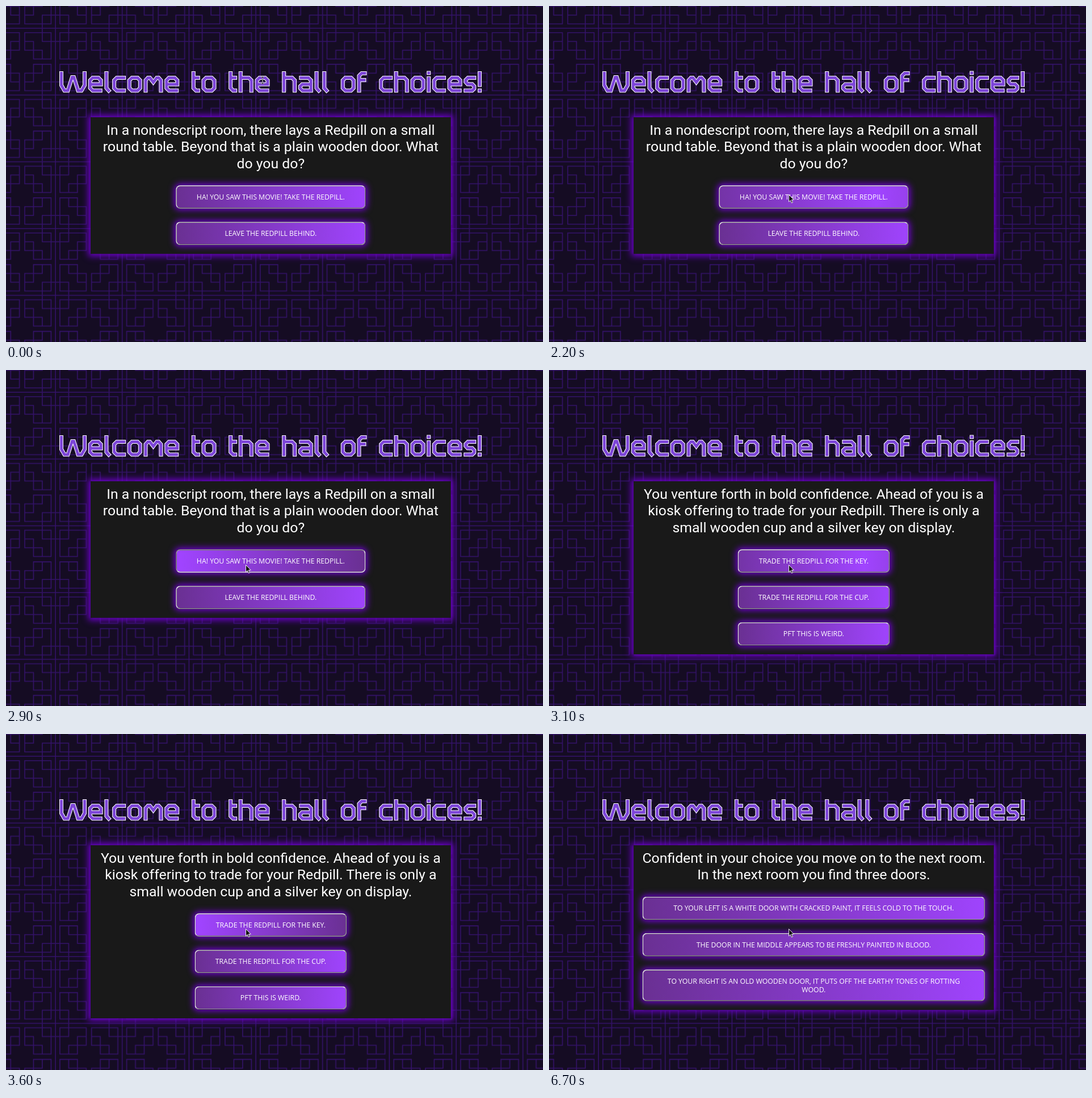
These frames come from a looping animation (946 px wide and 592 px high, 8 s). An HTML page:

```html
<!DOCTYPE html>
<html lang="en">
<head>
<meta charset="utf-8">
<title>Hall of choices</title>
<style>
  html, body { margin: 0; width: 100%; height: 100%; overflow: hidden; background: #150c23; }
  svg { position: absolute; left: 0; top: 0; }
  #panel {
    position: absolute; left: 148.8px; top: 196.2px; width: 820px; box-sizing: border-box;
    padding: 10px 20px 20px; background: #191919; color: #fff; text-align: center; white-space: pre;
    transform: scale(.774); transform-origin: 0 0; box-shadow: 0 0 14px 5px #6a00c8;
  }
  #panel p { margin: 0 0 31px; font: 32px/38px Roboto, sans-serif; }
  .choice {
    box-sizing: border-box; margin: 30px auto 0; padding: 15px 0;
    font: 15.85px/19px "Open Sans", sans-serif; text-transform: uppercase;
    border: 2px solid; border-color: #e6e6e6 #989898 #989898 #e6e6e6; border-radius: 10px;
    background: linear-gradient(to right, #6a3093 0%, #a044ff 51%, #6a3093 100%) 0 0 / 200% auto;
    box-shadow: 0 0 14px 4px #6a00c8;
  }
  p + .choice { margin-top: 0; }
  .choice.pressed { border-color: #989898 #e6e6e6 #e6e6e6 #989898; }
</style>
</head>
<body>
<svg id="back" width="946" height="592"></svg>
<div id="panel"></div>
<svg width="946" height="592">
  <g id="cursor">
    <path id="beam" d="M-3 -6H-1L0 -5L1 -6H3M0 -5V5M-3 6H-1L0 5L1 6H3" fill="none" stroke="#222" style="filter:drop-shadow(0 0 .6px #fff) drop-shadow(0 0 .4px #fff)"/>
    <path id="arrow" d="M.5 .5V13L3.4 10.4L5.4 15L7.4 14.1L5.4 9.6H9.3Z" fill="#111" stroke="#fff" stroke-width=".9"/>
  </g>
</svg>
<script>
const $ = id => document.getElementById(id);

// Background: one quadrant of the tile, mirrored four ways
const quadrant = 'M29 0V9M0 29H9M9 9H69V49H49V69H9ZM49 49V29H69M49 49H29V69M9 29H29V9';
const mirrors = ['1 0 0 1 0 0', '-1 0 0 1 150 0', '1 0 0 -1 0 150', '-1 0 0 -1 150 150'];
const tile = mirrors.map(m => `<path d="${quadrant}" transform="matrix(${m})"/>`).join('')
  + '<path d="M0 151H152M151 0V152"/>';

// Title lettering: [width, centre line]
const glyphs = {
  W: [48, 'M3.5 0V21L9 30.5H15L22.5 7H25.5L33 30.5H39L44.5 21V0'],
  e: [26, 'M3.5 19.5H22.5V12.5L18 8H8L3.5 12.5V26L8 30.5H21.5'],
  l: [11, 'M3.5 0V26L7.5 30.5'],
  c: [24, 'M20.5 8H8L3.5 12.5V26L8 30.5H20.5'],
  o: [26, 'M8 8H18L22.5 12.5V26L18 30.5H8L3.5 26V12.5Z'],
  m: [34, 'M3.5 30.5V12.5L7.5 8H11L17 16L23 8H26.5L30.5 12.5V30.5'],
  t: [15, 'M3.5 0V26L8 30.5H11.5M3.5 8H11.5'],
  h: [26, 'M3.5 0V30.5M3.5 8H18L22.5 12.5V30.5'],
  a: [26, 'M5 8H18L22.5 12.5V30.5H7.5L3.5 26.5V23L7 19.5H22.5'],
  f: [17, 'M3.5 30.5V4.5L8 0H13.5M3.5 12H12.5'],
  i: [7, 'M3.5 -.5h.01M3.5 9V30.5'],
  s: [22, 'M18.5 8H7.5L3.5 12V15.5L7 19.3H15L18.5 23V27L15 30.5H3.5'],
  '!': [7, 'M3.5 0V20.5M3.5 30.5h.01']
};

function lettering(text) {
  let x = 94, out = '';
  for (const ch of text) {
    if (ch === ' ') { x += 18.9; continue; }
    const [width, d] = glyphs[ch];
    out += `<path d="${d}" transform="translate(${x} 118.5)"/>`;
    x += width + 2.7;
  }
  return out;
}

const title = lettering('Welcome to the hall of choices!');
$('back').innerHTML = `
  <pattern id="temple" width="152" height="152" patternUnits="userSpaceOnUse"
    patternTransform="translate(-29.7 40) scale(.774)">
    <g fill="none" stroke="#34126a" stroke-width="2">${tile}</g>
  </pattern>
  <rect width="946" height="592" fill="url(#temple)"/>
  <g fill="none" stroke-linecap="square">
    <g stroke="#fff" stroke-width="7">${title}</g>
    <g stroke="#7d45d8" stroke-width="4.9">${title}</g>
  </g>`;

// Story: when each scene starts, when its first choice is hovered and pressed
const scenes = [
  { start: 0, hover: 2125, press: 2900, width: 432,
    text: 'In a nondescript room, there lays a Redpill on a small\nround table. Beyond that is a plain wooden door. What\ndo you do?',
    choices: ['Ha! You saw this movie! Take the Redpill.', 'Leave the Redpill behind.'] },
  { start: 3100, hover: 3025, press: 6500, width: 346,
    text: 'You venture forth in bold confidence. Ahead of you is a\nkiosk offering to trade for your Redpill. There is only a\nsmall wooden cup and a silver key on display.',
    choices: ['Trade the Redpill for the key.', 'Trade the Redpill for the cup.', 'Pft this is weird.'] },
  { start: 6700, hover: Infinity, press: Infinity, width: 780,
    text: 'Confident in your choice you move on to the next room.\nIn the next room you find three doors.',
    choices: ['To your left is a white door with cracked paint, it feels cold to the touch.',
      'The door in the middle appears to be freshly painted in blood.',
      'To your right is an old wooden door, it puts off the earthy tones of rotting\nwood.'] }
];

// Cursor path: [time, x, y]
const path = [[1200, 452, 131], [1300, 444, 146], [1400, 425, 172], [1600, 378, 245], [1700, 366, 278],
  [1800, 367, 300], [1900, 378, 310], [2000, 378, 310], [2100, 408, 314], [2200, 422, 332], [2400, 422, 343]];

function cursorAt(t) {
  const i = path.findIndex(p => p[0] > t);
  if (i === 0) return path[0].slice(1);
  if (i < 0) return path[path.length - 1].slice(1);
  const [a, b] = [path[i - 1], path[i]], k = (t - a[0]) / (b[0] - a[0]);
  return [a[1] + (b[1] - a[1]) * k, a[2] + (b[2] - a[2]) * k];
}

// CSS "ease" curve, solved by bisection
function ease(x) {
  if (x <= 0) return 0;
  if (x >= 1) return 1;
  const bezier = (s, a, b) => 3 * s * (1 - s) ** 2 * a + 3 * s * s * (1 - s) * b + s ** 3;
  let s = .5;
  for (let step = .25; step > 1e-5; step /= 2) s += bezier(s, .25, .25) < x ? step : -step;
  return bezier(s, .1, 1);
}

let shown;
function show(scene) {
  shown = scene;
  $('panel').innerHTML = `<p>${scene.text}</p>` + scene.choices.map(c =>
    `<div class="choice" style="width:${scene.width}px">${c}</div>`).join('');
}

function draw(now) {
  const t = Math.floor(now % 8000 / 100) * 100; // ten pictures per second
  const scene = scenes.filter(s => s.start <= t).pop();
  if (scene !== shown) show(scene);

  const first = $('panel').querySelector('.choice');
  first.style.backgroundPosition = ease((t - scene.hover) / 500) * 100 + '% 0';
  first.classList.toggle('pressed', t >= scene.press);

  const [x, y] = cursorAt(t), overTitle = y < 160;
  $('cursor').setAttribute('transform', `translate(${x} ${y})`);
  $('beam').style.display = overTitle ? '' : 'none';
  $('arrow').style.display = overTitle ? 'none' : '';
}

const begin = performance.now();
function frame() {
  draw(performance.now() - begin);
  requestAnimationFrame(frame);
}
frame();
</script>
</body>
</html>
```
